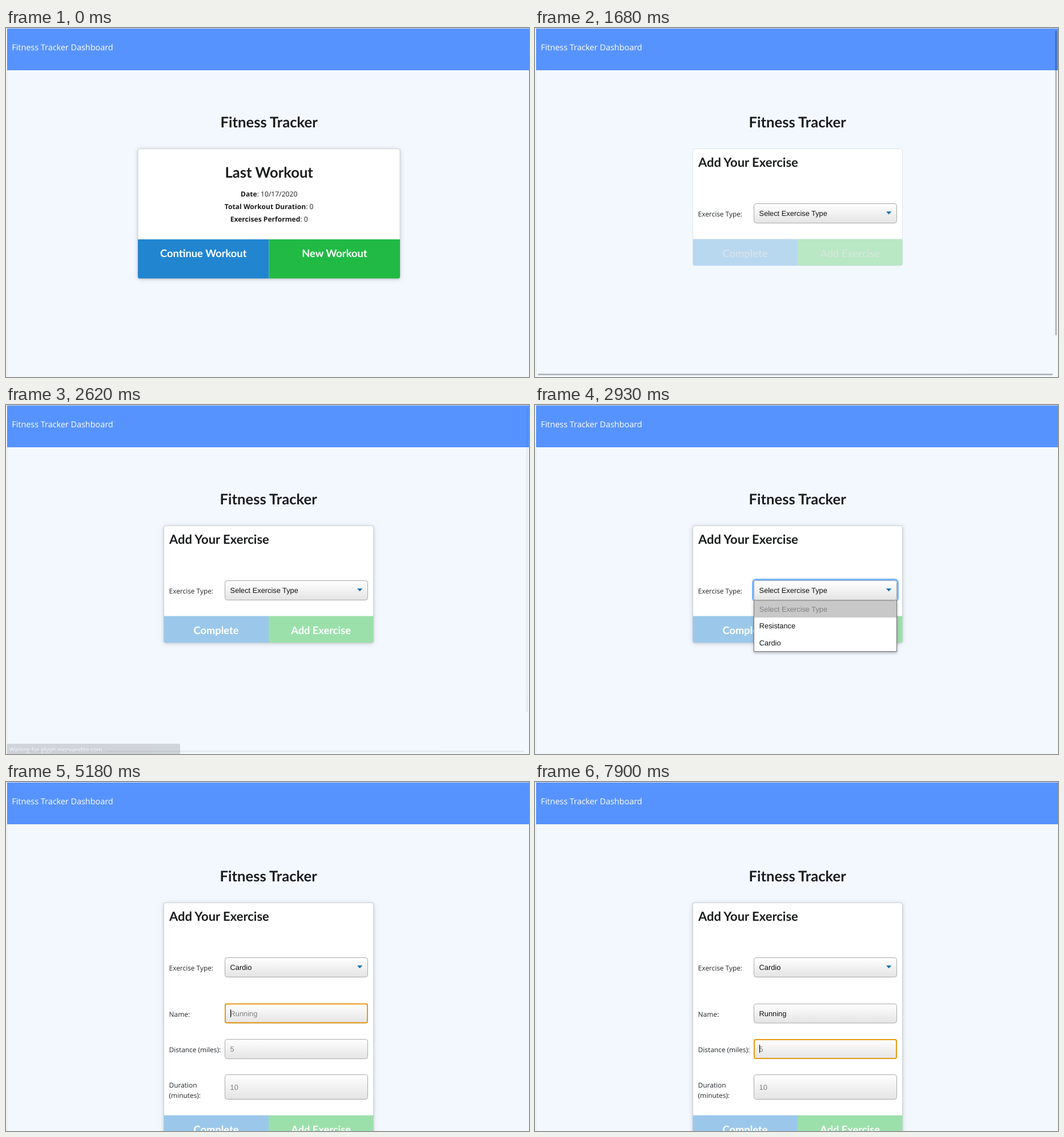
An HTML page for the animation above (8 s loop, 916 by 611 pixels).

```html
<!DOCTYPE html>
<html lang="en">
<head>
<meta charset="utf-8">
<title>Fitness Tracker</title>
<style>
  html, body { margin: 0; width: 100%; height: 100%; overflow: hidden; background: #f3f8ff; }
  svg { display: block; width: 100%; height: 100%; }
  text { font: 11.9px "Open Sans", "Noto Sans", sans-serif; fill: #212529; text-rendering: geometricPrecision; white-space: pre; }
  .mid { text-anchor: middle; }
  .h1, .h2, .btn { font-family: Lato, sans-serif; font-weight: 700; fill: #1b1c1d; }
  .h1 { font-size: 25.6px; }
  .h2 { font-size: 21.94px; }
  .btn { font-size: 18.29px; fill: #fff; }
  .stat { font-size: 12.1px; fill: #1b1c1d; }
  .stat tspan { font-weight: 700; }
  .field { font: 12.8px "Liberation Sans", Arial, sans-serif; fill: #111; }
  .hint { fill: #808080; }
  .card { fill: #fff; stroke: #d0d3d7; }
  .raised { filter: drop-shadow(0 1.8px 1.8px rgba(34,36,38,.12)) drop-shadow(0 1.8px 4.5px rgba(34,36,38,.15)); }
  .popup { filter: drop-shadow(0 2px 2.5px rgba(0,0,0,.3)); }
</style>
</head>
<body>
<svg viewBox="0 0 916 611">
  <defs>
    <linearGradient id="shade" x2="0" y2="1">
      <stop stop-color="#fff"/><stop offset="1" stop-color="#e4e4e4"/>
    </linearGradient>
  </defs>

  <rect width="916" height="611" fill="#f3f8ff"/>
  <rect width="916" height="1" fill="#d9dde4"/>
  <rect width="1" height="611" fill="#fff"/>
  <rect x="1" width="1" height="611" fill="#dde1e6"/>
  <rect x="2" y="1" width="914" height="73" fill="#5793ff"/>
  <text x="10.3" y="39" style="font-size:14.4px;fill:#fff">Fitness Tracker Dashboard</text>
  <text id="title" class="h1 mid" y="174">Fitness Tracker</text>

  <g id="home">
    <rect class="card raised" x="231" y="211.5" width="459" height="227" rx="3.5"/>
    <text class="h1 mid" x="460.7" y="262">Last Workout</text>
    <text class="stat mid" x="460.7" y="295"><tspan>Date</tspan>: 10/17/2020</text>
    <text class="stat mid" x="460.7" y="317"><tspan>Total Workout Duration</tspan>: 0</text>
    <text class="stat mid" x="460.7" y="339"><tspan>Exercises Performed</tspan>: 0</text>
    <path d="M231 370H460.5V438.5H234.5Q231 438.5 231 435Z" fill="#2185d0"/>
    <path id="newButton" d="M460.5 370H690V435Q690 438.5 686.5 438.5H460.5Z"/>
    <text class="btn mid" x="345.8" y="401">Continue Workout</text>
    <text class="btn mid" x="575.4" y="401">New Workout</text>
  </g>

  <g id="form">
    <rect id="raise" class="card raised" x="276.5" y="211.5" width="367" rx="3.5"/>
    <rect id="card" class="card" x="276.5" y="211.5" width="367" rx="3.5"/>
    <text class="h2" x="286" y="243">Add Your Exercise</text>
    <text x="285.6" y="330">Exercise Type:</text>

    <g id="actions">
      <path id="complete" d="M276.5 369.5H460V416H279.5Q276.5 416 276.5 413Z"/>
      <path id="add" d="M460 369.5H643.5V413Q643.5 416 640.5 416H460Z"/>
      <text id="completeText" class="btn mid" x="368" y="400.5">Complete</text>
      <text id="addText" class="btn mid" x="551.6" y="400.5">Add Exercise</text>
    </g>

    <rect id="ring" x="381.5" y="305.5" width="254" height="38" rx="5.5" fill="none" stroke="#76b5fa" stroke-width="3"/>
    <rect x="383.5" y="307.5" width="250" height="34" rx="4" fill="url(#shade)" stroke="#aaa"/>
    <path d="M615 321.3H624.4L619.7 326.3Z" fill="#0b73b5"/>
    <text id="choice" class="field" x="392.6" y="329"></text>

    <g id="cardio">
      <text x="285.6" y="410.5">Name:</text>
      <text x="285.6" y="473">Distance (miles):</text>
      <text x="285.6" y="535">Duration</text>
      <text x="285.6" y="552.5">(minutes):</text>
      <rect x="383.5" y="388.5" width="250" height="33.5" rx="4" fill="url(#shade)" stroke="#aaa"/>
      <rect x="383.5" y="450.5" width="250" height="34" rx="4" fill="url(#shade)" stroke="#aaa"/>
      <rect x="383.5" y="512.5" width="250" height="43" rx="4" fill="url(#shade)" stroke="#aaa"/>
      <rect id="focus" x="384" width="249" height="33" rx="2.5" fill="none" stroke="#e59a14" stroke-width="2"/>
      <text id="nameHint" class="field hint" x="392.6" y="409.5">Running</text>
      <text id="name" class="field" x="392.6" y="409.5"></text>
      <text class="field hint" x="392.6" y="472">5</text>
      <text class="field hint" x="392.6" y="538.7">10</text>
      <rect id="caret" width="1" height="14" fill="#000"/>
    </g>

    <g id="popup">
      <rect class="popup" x="383.5" y="342.5" width="250" height="89" fill="#fff" stroke="#767676"/>
      <rect id="highlight" x="384" width="249" height="29.5"/>
      <text class="field hint" x="392.8" y="362">Select Exercise Type</text>
      <text class="field" x="392.8" y="391">Resistance</text>
      <text id="optCardio" class="field" x="392.8" y="420.5">Cardio</text>
    </g>
  </g>

  <g id="bars" fill="#000">
    <rect x="911" y="5" width="3" height="533" rx="1"/>
    <rect x="5" y="605" width="902" height="3" rx="1"/>
  </g>
  <g id="status">
    <path d="M2 593H302Q305 593 305 596V611H2Z" fill="#35363a"/>
    <text x="6" y="606.5" style="font-size:10.3px;fill:#fff">Waiting for glyph.morvandite.com...</text>
  </g>
</svg>
<script>
const LOOP = 8000;
const el = Object.fromEntries([...document.querySelectorAll('[id]')].map(e => [e.id, e]));

// Each track lists [start ms, value]; a value holds until the next one.
const tracks = {
  form:      [[0, false], [1680, true]],
  hover:     [[0, '#21ba45'], [1130, '#1cb33f'], [1220, '#16ab39']],
  enabled:   [[0, false], [1760, true]],
  raise:     [[0, 0], [1910, .5], [1990, 1]],
  bars:      [[0, 0], [1680, .25], [1760, .27], [2390, .22], [2470, .16], [2550, .11], [2620, .05], [2700, 0]],
  status:    [[0, 0], [1910, .2], [1990, .4], [2070, .6], [2160, .8], [2240, 1],
              [2390, .78], [2470, .58], [2550, .38], [2620, .18], [2700, 0]],
  popup:     [[0, false], [2930, true], [4250, false]],
  picked:    [[0, false], [4170, true]],
  cardio:    [[0, false], [4250, true]],
  ring:      [[0, false], [2930, true], [5180, false]],
  focusY:    [[0, 0], [5180, 388.5], [7900, 451]],
  caret:     [[0, false], [5180, true], [5730, false], [6190, true]],
  typed:     [[0, 0], [6510, 1], [6740, 2], [7040, 3], [7120, 4], [7270, 5], [7440, 7]]
};

const valueAt = (track, t) => track.reduce((held, [start, value]) => t >= start ? value : held, track[0][1]);
const show = (node, on) => node.setAttribute('display', on ? 'inline' : 'none');
const set = (node, attrs) => { for (const key in attrs) node.setAttribute(key, attrs[key]); };

function draw(t) {
  const s = {};
  for (const key in tracks) s[key] = valueAt(tracks[key], t);

  set(el.title, { x: s.form ? 459.7 : 460.7 });
  show(el.home, !s.form);
  show(el.form, s.form);
  set(el.newButton, { fill: s.hover });

  const height = s.cardio ? 419 : 204.5;
  set(el.card, { height });
  set(el.raise, { height, opacity: s.raise });
  el.card.style.stroke = s.raise ? '#d0d3d7' : '#dee3ea';
  set(el.actions, { transform: `translate(0 ${s.cardio ? 214 : 0})` });
  set(el.complete, { fill: s.enabled ? '#9bc8ea' : '#b8d8f0' });
  set(el.add, { fill: s.enabled ? '#9be0ab' : '#b8e8c4' });
  el.completeText.style.fill = s.enabled ? '#fff' : '#d5e0e8';
  el.addText.style.fill = s.enabled ? '#fff' : '#d2e6d7';

  el.choice.textContent = s.cardio ? 'Cardio' : 'Select Exercise Type';
  show(el.ring, s.ring);
  show(el.popup, s.popup);
  set(el.highlight, s.picked ? { y: 401.5, fill: '#ade1f5' } : { y: 342.5, fill: '#c8c8c8' });
  el.optCardio.style.fill = s.picked ? '#fff' : '#111';

  show(el.cardio, s.cardio);
  show(el.focus, s.focusY);
  set(el.focus, { y: s.focusY });
  show(el.nameHint, !s.typed);
  el.name.textContent = 'Running'.slice(0, s.typed);
  show(el.caret, s.caret);
  const onName = s.focusY < 400;
  const advance = s.typed && onName && s.cardio ? el.name.getComputedTextLength() : 0;
  set(el.caret, { x: Math.round(392.8 + advance), y: onName ? 398 : 460 });

  set(el.bars, { opacity: s.bars });
  set(el.status, { opacity: s.status });
}

function tick() {
  draw(performance.now() % LOOP);
  requestAnimationFrame(tick);
}
tick();
</script>
</body>
</html>
```
